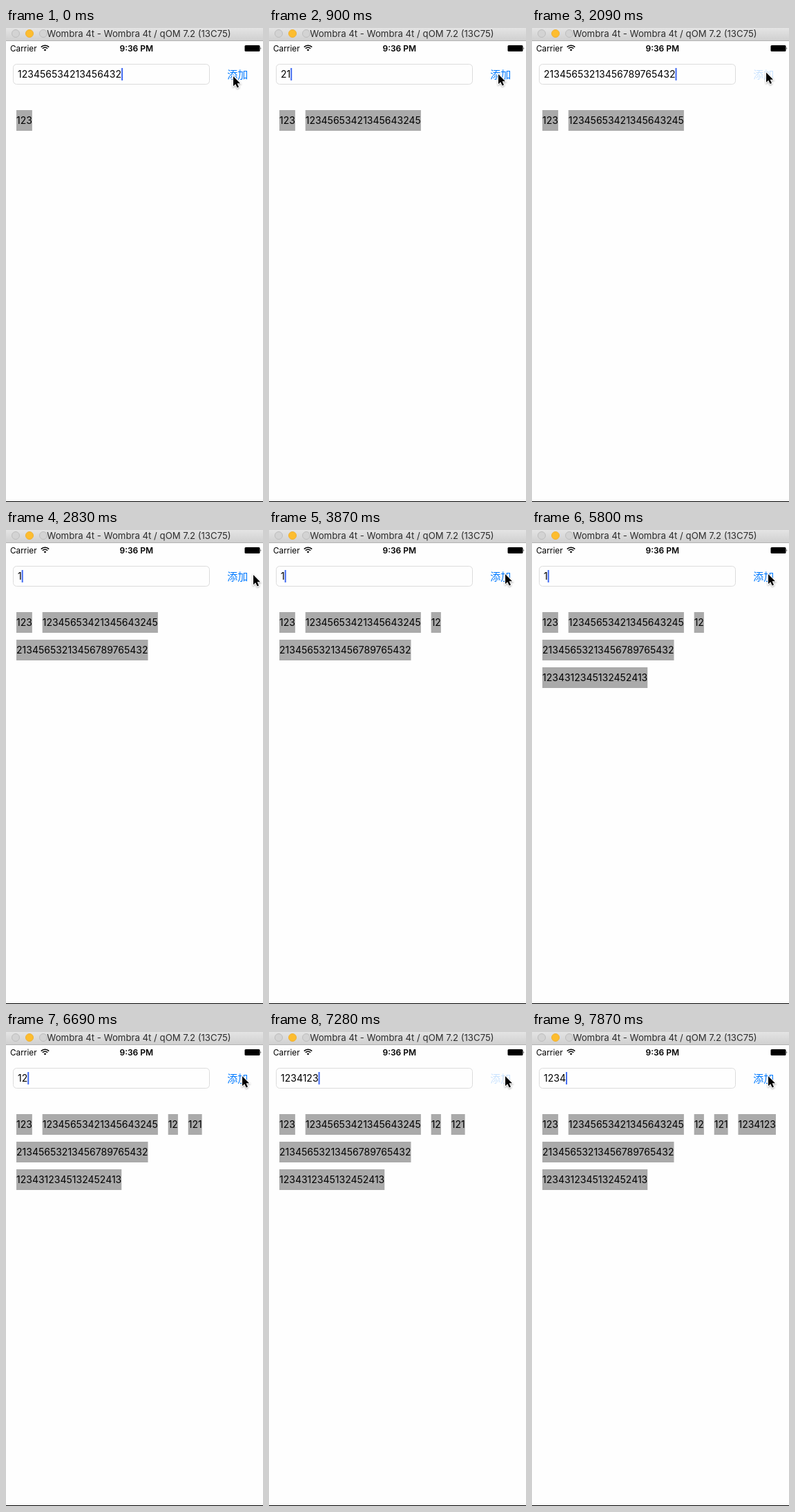
Animation of 372 by 687 pixels, one loop 8 s. Source, as an HTML page:

```html
<!DOCTYPE html>
<html lang="zh">
<head>
<meta charset="utf-8">
<style>
  html, body { margin: 0; width: 100%; height: 100%; overflow: hidden; background: #fefefe; }
  svg { display: block; width: 372px; height: 687px; }
  text { font: 14px Inter, Roboto, sans-serif; white-space: pre; }
</style>
</head>
<body>
<svg viewBox="0 0 372 687">
  <defs>
    <linearGradient id="bar" x2="0" y2="1">
      <stop stop-color="#e4e4e4"/><stop offset="1" stop-color="#d0d0d0"/>
    </linearGradient>
  </defs>
  <rect width="372" height="687" fill="#fefefe"/>
  <rect width="372" height="18" fill="url(#bar)"/>
  <rect y="18" width="372" height="1" fill="#b4b4b4"/>
  <g fill="#d3d3d3" stroke="#bdbdbd">
    <circle cx="14" cy="8" r="5.5"/>
    <circle cx="34" cy="8" r="5.5" fill="#fdbd2f" stroke="#f0b030"/>
    <circle cx="54" cy="8" r="5.5"/>
  </g>
  <text x="192.5" y="13" text-anchor="middle" fill="#2c2c2c" style="font-size:13.2px">Wombra 4t - Wombra 4t / qOM 7.2 (13C75)</text>

  <text x="6" y="33.5" style="font-size:11.8px">Carrier</text>
  <g fill="none" stroke="#000" stroke-width="1.6">
    <path d="M50.8 27.6a8 8 0 0 1 11.4 0M52.9 29.8a5 5 0 0 1 7.2 0"/>
    <path d="M56.5 33.6l-1.9-2a2.8 2.8 0 0 1 3.8 0z" fill="#000" stroke="none"/>
  </g>
  <text x="188.8" y="33.5" text-anchor="middle" style="font-size:12px;font-weight:600">9:36 PM</text>
  <rect x="345.5" y="25" width="22" height="9" rx="1.5"/>
  <path d="M368.5 27.8q1.5 1.7 0 3.4z"/>

  <rect x="10.5" y="52.5" width="284" height="29" rx="5" fill="#fefefe" stroke="#dcdcdc"/>
  <text id="field" x="17" y="72"></text>
  <rect id="caret" y="58" width="2" height="18" fill="#426bf2"/>
  <text id="add" x="320.3" y="72.8" fill="#007aff" style="font:15px 'Noto Sans CJK SC','Noto Sans CJK',sans-serif">添加</text>
  <g id="chips"></g>
  <path id="mouse" d="M0 0V14.2L3.2 11.2L5.7 16.6L8 15.6L5.6 10.3H10Z" stroke="#fff" stroke-width="2" paint-order="stroke" style="filter:drop-shadow(0 1px 1px #0005)"/>
  <rect y="686" width="372" height="1"/>
</svg>
<script>
const $ = id => document.getElementById(id);
const LOOP = 8000, STEP = 148.4, WIDTH = 372, LEFT = 15, GAP = 14.8;

// each word and the step at which the button is pressed
const words = [
  ['123', -34], ['12345653421345643245', 3], ['21345653213456789765432', 14], ['12', 23],
  ['1234312345132452413', 35], ['121', 42], ['1234123', 49], ['1234', 54]
].map(([text, press], i, all) => ({ text, press, start: i ? all[i - 1][1] + 2 : press }));

// mouse stops: step, x, y
const stops = [[2, 329, 70], [5, 332, 67], [10, 332, 67], [13, 339, 64.5],
  [16, 339, 64.5], [19, 358, 65], [25, 342, 64]];

function add(parent, tag, attrs) {
  const el = document.createElementNS('http://www.w3.org/2000/svg', tag);
  for (const name in attrs) el.setAttribute(name, attrs[name]);
  return parent.appendChild(el);
}

// each chip goes into the first row with room for it
const rowEnds = [];
for (const word of words) {
  word.chip = add($('chips'), 'g', {});
  const box = add(word.chip, 'rect', { height: 30, fill: '#aaa' });
  const label = add(word.chip, 'text', {});
  label.textContent = word.text;
  const width = label.getComputedTextLength();
  let row = 0;
  while (rowEnds[row] + GAP + width > WIDTH) row++;
  const x = row in rowEnds ? rowEnds[row] + GAP : LEFT, y = 119 + row * 40;
  rowEnds[row] = x + width;
  box.setAttribute('width', width);
  box.setAttribute('x', x);
  box.setAttribute('y', y);
  label.setAttribute('x', x);
  label.setAttribute('y', y + 20);
}

// typing speeds up towards the press
function typed({ text, start, press }, k) {
  if (k < start) return '';
  const u = Math.min(1, (k - start + 1) / (press - start));
  return text.slice(0, Math.max(1, Math.round(text.length * u ** 1.6)));
}

function mouseAt(k) {
  const i = stops.findIndex(s => s[0] > k);
  if (i < 1) return stops.at(i).slice(1);
  const [a, b] = [stops[i - 1], stops[i]], u = (k - a[0]) / (b[0] - a[0]);
  return [1, 2].map(c => a[c] + (b[c] - a[c]) * u);
}

function draw(now) {
  const k = Math.floor((now % LOOP + 1) / STEP);
  const word = words.find(w => k <= w.press);
  $('field').textContent = typed(word, k);
  $('caret').setAttribute('x', 17 + $('field').getComputedTextLength());
  for (const w of words) w.chip.style.display = k > w.press ? '' : 'none';
  const justPressed = ago => words.some(w => w.press === k - ago);
  $('add').style.opacity = justPressed(0) ? .2 : justPressed(1) ? .55 : 1;
  $('mouse').setAttribute('transform', `translate(${mouseAt(k)})`);
  requestAnimationFrame(draw);
}
requestAnimationFrame(draw);
</script>
</body>
</html>
```
